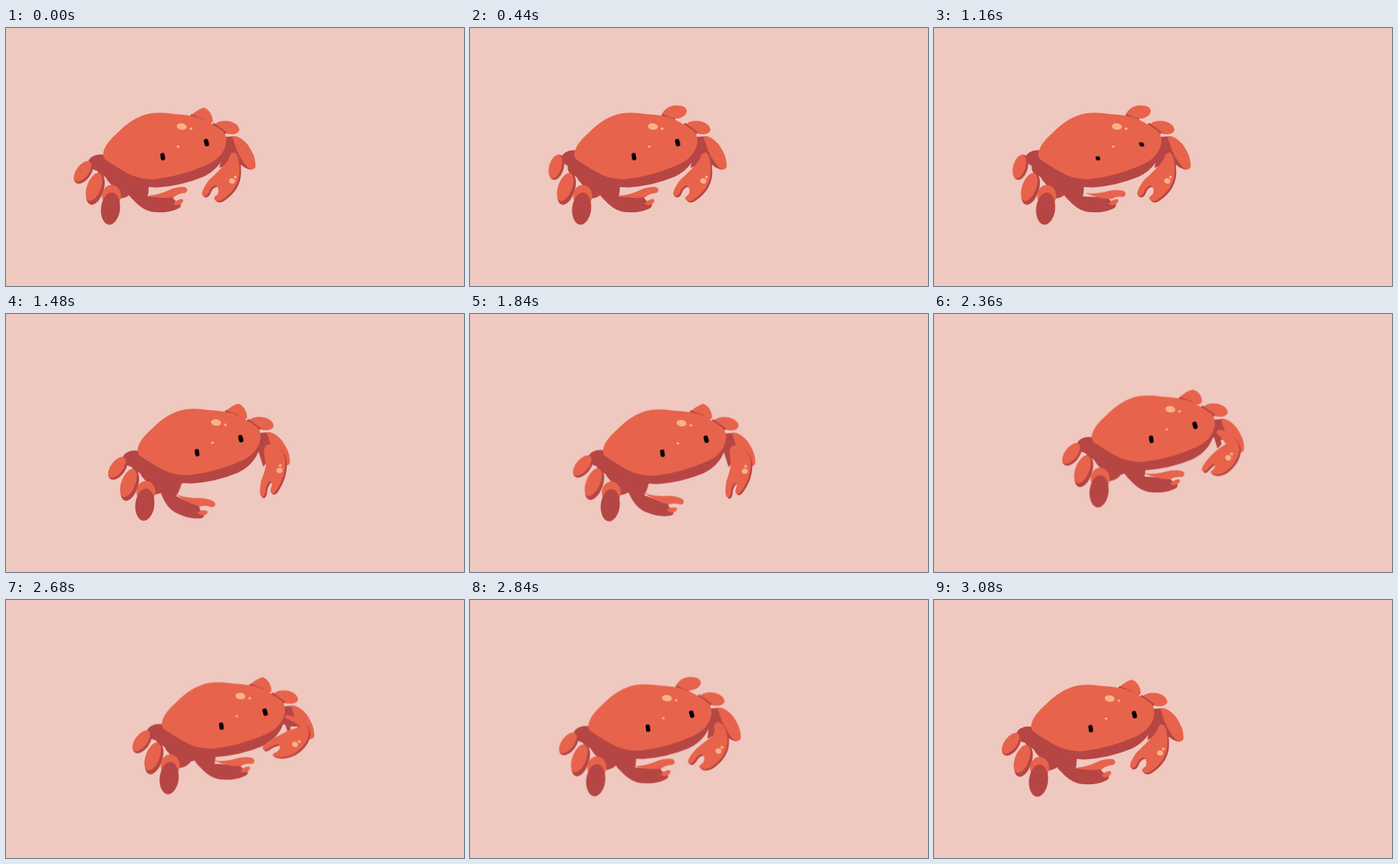
Write an HTML page without scripts that moves like this. It is 640x360 px and loops after 3.4 s.

```html
<!DOCTYPE html>
<html lang="en">
<head>
<meta charset="utf-8">
<title>Crab</title>
<style>
html, body { margin: 0; width: 100%; height: 100%; overflow: hidden; background: #efc8c0; }
svg { display: block; width: 100%; height: 100%; }
.o { fill: #e8634b; }
.d { fill: #b64644; }
.s { fill: #f8b486; }
.band { fill: none; stroke: #b64644; stroke-width: 4.5; }

svg {
  --reach: path("M313 180Q316 172 322 175Q327 182 327 200Q327 224 303 240Q296 244 292 240Q290 237 296 233Q300 226 294 220Q287 221 284 230Q280 237 275 234Q273 228 284 213Q299 199 304 193Q311 187 313 180Z");
  --hang: path("M313 178Q314 166 325 169Q342 175 343 192Q344 212 331 232Q327 238 323 236Q321 233 324 226Q325 221 321 220Q316 224 315 236Q313 243 309 241Q306 236 309 220Q315 205 316 196Q314 188 313 178Z");
  --shut: path("M315 176Q317 168 325 171Q342 182 344 200Q342 222 326 235Q321 240 319 236Q318 234 320 230Q321 226 318 227Q316 230 316 237Q313 246 309 240Q307 233 309 215Q310 203 312 196Q316 186 315 176Z");
  --fold: path("M308 168Q308 162 318 166Q341 172 342 190Q340 206 322 218Q304 227 291 221Q291 218 297 216Q305 209 299 205Q294 206 288 209Q278 217 277 210Q280 203 300 193Q320 182 332 181Q322 174 308 168Z");
  --toeIn: path("M256 124Q268 113 277 111Q288 116 289 130Q286 136 278 131Z");
  --toeOut: path("M257 122Q264 108 278 108Q293 108 293 117Q290 126 276 127Z");
}

.crab, .crab * { animation: 3.4s ease-in-out infinite; }
.crab { animation-name: walk; }
.crab .leg1 { animation-name: leg1; transform-origin: 108px 201px; }
.crab .joint { animation-name: joint; }
.crab .leg2 { animation-name: leg2; transform-origin: 125px 224px; }
.crab .back { animation-name: back; }
.crab .toe { d: var(--toeIn); animation-name: toe; }
.crab .elbow { animation-name: elbow; transform-origin: 312px 172px; }
.crab .claw { d: var(--reach); animation-name: claw; }
.crab .spots { animation-name: spots; transform-origin: 316px 213px; }
.crab .arm { animation-name: arm; transform-origin: 180px 215px; }
.crab .finger { animation-name: finger; transform-origin: 225px 232px; }
.crab .eye { animation-name: blink; transform-box: fill-box; transform-origin: 50% 100%; }

@keyframes walk {
  0%, 1.2% { transform: none; }
  12.9%, 34.1% { transform: translate(10px, 0); }
  43.5%, 49.4% { transform: translate(48px, 14px); }
  52% { transform: translate(49px, 15.5px); animation-timing-function: ease-in; }
  61.2% { transform: translate(60.5px, 7px); animation-timing-function: linear; }
  65.9% { transform: translate(76px, -2px); animation-timing-function: ease-out; }
  71% { transform: translate(86px, -5px); }
  78.8% { transform: translate(82px, -3.5px); animation-timing-function: ease-in; }
  82.4% { transform: translate(47px, -1px); animation-timing-function: ease-out; }
  87.5% { transform: translate(-3px, 0); }
  90.6%, 100% { transform: none; }
}
@keyframes leg1 {
  0%, 1.2%, 43.5%, 51%, 71%, 82.4%, 90.6%, 100% { transform: none; }
  12.9%, 34.1% { transform: translate(2.5px, -7px) rotate(-20deg); }
  37% { transform: translate(-1px, -14px) rotate(14deg); }
  61.2% { transform: translate(-1px, -17px) rotate(18deg); }
}
@keyframes joint {
  0%, 1.2%, 43.5%, 51%, 71%, 100% { transform: none; }
  12.9%, 34.1% { transform: translate(3px, -6px); }
  61.2% { transform: translate(1px, -8px); }
}
@keyframes leg2 {
  0%, 51%, 71%, 100% { transform: none; }
  61.2% { transform: translate(-4px, -9px) rotate(12deg); }
}
@keyframes back {
  0%, 51%, 71%, 100% { transform: none; }
  61.2% { transform: translate(-3px, -3px); }
}
@keyframes toe {
  0%, 1.2%, 43.5%, 61.2%, 71%, 80%, 90.6%, 100% { d: var(--toeIn); }
  12.9%, 34.1%, 66.5%, 84% { d: var(--toeOut); }
}
@keyframes elbow {
  0%, 17.6%, 34.1%, 86%, 100% { transform: none; }
  25%, 43.5%, 65% { transform: rotate(-30deg); }
  73%, 79% { transform: rotate(-30deg) scale(.6); }
}
@keyframes claw {
  0%, 17.6%, 34.1%, 86%, 100% { d: var(--reach); }
  25%, 43.5%, 51% { d: var(--hang); }
  61.2%, 65% { d: var(--shut); }
  73%, 79% { d: var(--fold); }
}
@keyframes spots {
  0%, 17.6%, 34.1%, 86%, 100% { transform: none; }
  25%, 43.5%, 51% { transform: translate(18px, -9px) rotate(-31deg); }
  61.2%, 65% { transform: translate(17px, -8px) rotate(-20deg); }
  73%, 79% { transform: translate(6px, -8.5px) rotate(18deg); }
}
@keyframes arm {
  0%, 34.1%, 86%, 100% { transform: none; }
  43.5%, 51% { transform: rotate(21deg); }
  61.2% { transform: translate(11px, -6px); }
  73%, 79% { transform: translate(11.5px, -3px); }
}
@keyframes finger {
  0%, 17.6%, 86%, 100% { transform: none; }
  25% { transform: rotate(-5deg); }
  34.1% { transform: translate(4px, 1px) rotate(10deg); }
  43.5%, 51% { transform: rotate(3deg); }
  61.2% { transform: translate(0, 2px) rotate(13deg); }
  73%, 79% { transform: translate(0, 1px) rotate(9deg); }
}
@keyframes blink {
  0%, 33%, 41%, 100% { transform: none; }
  34.1% { transform: scaleY(.58); }
  35.5%, 37% { transform: scaleY(.15); }
}
</style>
</head>
<body>
<svg viewBox="0 0 640 360">
  <g class="crab">
    <!-- back legs -->
    <g class="back">
      <path class="o toe"/>
      <path class="band" d="M258 122L276 129"/>
      <path class="o" d="M291 135Q298 128 312 130Q326 134 326 143Q322 151 306 147Z"/>
      <path class="band" d="M289 134L307 147"/>
    </g>

    <!-- front right leg -->
    <path class="d" d="M305 152L320 151Q326 175 344 198Q333 197 323 186L326 180H313L304 176Z"/>
    <path class="d elbow" d="M304 168L318 170L313 180L308 192L298 195Z"/>
    <path class="o" d="M316 151Q326 149 338 163Q350 180 348.500 194Q346 200 338 195Q328 184 322 169Q319 160 316 151Z"/>

    <!-- left legs -->
    <ellipse class="d joint" cx="132" cy="188" rx="17" ry="11.500"/>
    <path class="d" d="M140 176L128 186Q124 197 130 203Q140 207 142 213L149 221Q160 222 160 238Q172 236 176 229L200 222V200Z"/>
    <g class="leg1">
      <ellipse class="d" cx="108.500" cy="201.500" rx="10" ry="18" transform="rotate(37 108.500 201.500)"/>
      <ellipse class="o" cx="107" cy="200" rx="8.600" ry="17" transform="rotate(37 107 200)"/>
    </g>
    <g class="leg2">
      <ellipse class="d" cx="125" cy="224.500" rx="11.500" ry="23" transform="rotate(18 125 224.500)"/>
      <ellipse class="o" cx="123" cy="221.800" rx="9.700" ry="20.500" transform="rotate(21 123 221.800)"/>
    </g>
    <ellipse class="o" cx="147.500" cy="234" rx="13.300" ry="15"/>
    <ellipse class="d" cx="146" cy="252" rx="13.300" ry="22.500" transform="rotate(6 146 252)"/>

    <!-- left claw -->
    <g class="arm">
      <path class="d" d="M163 205Q165 229 178 240Q193 257 210 257Q228 258 238 253Q246 250 244 246Q235 241 233 236Q215 236 198 235Q200 228 199 216Z"/>
      <path class="o" d="M234 246Q236 240 246 238.500Q250 241 244 246Q239 248 234 246Z"/>
      <path class="o finger" d="M197 234Q214 233 228 226Q240 221 250 222Q256 225 251 230Q240 231 235 236Q216 239 197 234Z"/>
    </g>

    <!-- shell -->
    <path class="d" d="M137 180L160 205Q185 223 212 222.500Q246 220 276 207.500Q304 194 308 165L300 150Z"/>
    <path class="o" d="M136 174Q138 162 155 147Q178 123 203 119Q218 117 235 120Q255 121 270 125Q290 134 303 144Q310 152 307 163Q303 180 283 190Q245 207 207 211Q185 212 165 200Q148 190 138 183Q135 179 136 174Z"/>
    <g class="s">
      <ellipse cx="245.500" cy="137.500" rx="7" ry="4.500" transform="rotate(8 245.500 137.500)"/>
      <ellipse cx="258.500" cy="140.500" rx="2" ry="1.800"/>
      <ellipse cx="240.500" cy="165.500" rx="1.900" ry="1.500"/>
    </g>
    <g class="eye"><rect x="216" y="174.300" width="6" height="10.400" rx="3" transform="rotate(-8 219 179.500)"/></g>
    <g class="eye"><rect x="277" y="154.800" width="6.200" height="10.400" rx="3" transform="rotate(-15 280 160)"/></g>

    <!-- right claw -->
    <g transform="translate(1.500 1.500)"><path class="d claw"/></g>
    <g transform="translate(-.7 -.5)"><path class="o claw"/></g>
    <g class="s spots">
      <ellipse cx="316" cy="213.500" rx="4.200" ry="3.600" transform="rotate(20 316 213.500)"/>
      <circle cx="320.500" cy="208" r="2"/>
    </g>
  </g>
</svg>
</body>
</html>
```
